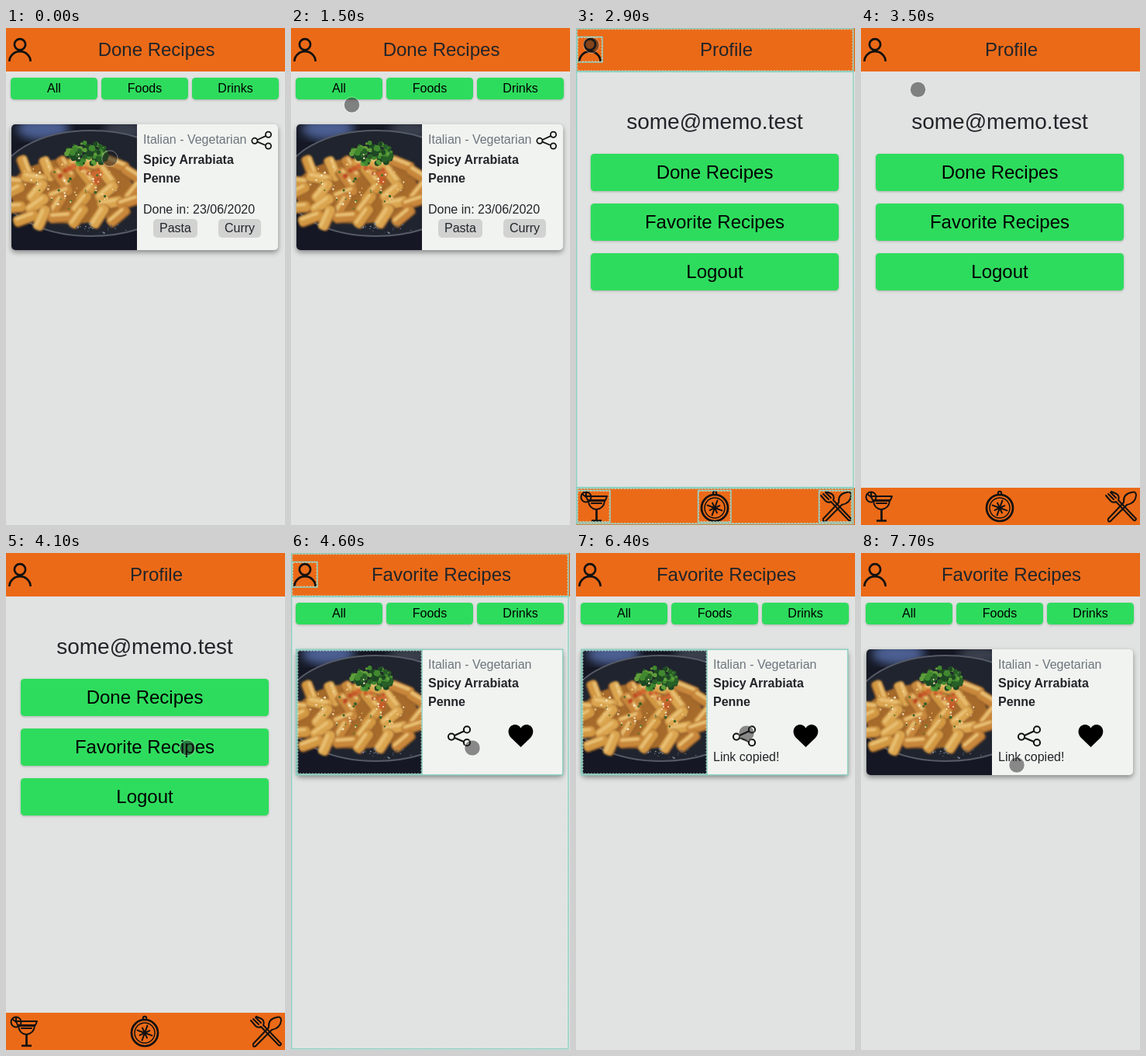
These frames come from a looping animation (360 px wide and 640 px high, 8 s). An HTML page:

```html
<!DOCTYPE html>
<html lang="en">
<head>
<meta charset="utf-8">
<title>Recipe app walkthrough</title>
<style>
  html, body { margin: 0; width: 100%; height: 100%; overflow: hidden; background: #e1e3e2; }
  svg { display: block; width: 100vw; height: 100vh; font-family: "Liberation Sans", Arial, sans-serif; }
  .mid { text-anchor: middle; }
  .button { fill: #2edc5d; filter: drop-shadow(0 1px 1.5px rgba(0, 0, 0, .22)); }
  .card { fill: #f1f3f0; filter: drop-shadow(0 3px 3px rgba(0, 0, 0, .4)); }
  .line { fill: none; stroke: #111; stroke-width: 2; stroke-linecap: round; stroke-linejoin: round; }
  .thin { stroke-width: 1.5; }
  .bold { stroke-width: 2.7; stroke-linecap: butt; }
  .flash { fill: none; stroke: #8fcfc1; stroke-width: 1.5; }
  .dash { fill: none; stroke: #d3ece2; stroke-width: .7; stroke-dasharray: 2 2; }
</style>
</head>
<body>
<svg id="stage" viewBox="0 0 360 640" preserveAspectRatio="none"></svg>
<script>
const LOOP = 8000, STEP = 100;
const INK = '#212529', ORANGE = '#eb6a18';

const rect = (x, y, w, h, attrs = '') => `<rect x="${x}" y="${y}" width="${w}" height="${h}" ${attrs}/>`;
const circle = (x, y, r, attrs = 'class="line"') => `<circle cx="${x}" cy="${y}" r="${r}" ${attrs}/>`;
const ellipse = (x, y, rx, ry, attrs) => `<ellipse cx="${x}" cy="${y}" rx="${rx}" ry="${ry}" ${attrs}/>`;
const path = (d, attrs = 'class="line"') => `<path d="${d}" ${attrs}/>`;
const text = (x, y, size, value, attrs = '', fill = INK) =>
  `<text x="${x}" y="${y}" font-size="${size}" fill="${fill}" ${attrs}>${value}</text>`;
const group = (id, content) => `<g id="${id}">${content}</g>`;
const repeat = (n, draw) => Array.from({ length: n }, (_, i) => draw(i)).join('');

function seeded(seed) {
  return () => (seed = seed * 16807 % 2147483647) / 2147483647;
}

function button(x, y, w, h, size, label) {
  return rect(x, y, w, h, 'rx="4.5" class="button"') +
    text(x + w / 2, Math.round(y + h / 2 + size * .34), size, label, 'class="mid"', '#000');
}

function header(title) {
  return rect(0, 0, 360, 56, `fill="${ORANGE}"`) +
    circle(18, 21.2, 7.1, 'class="line bold"') +
    path('M4.4 43A13.6 12.8 0 0 1 31.6 43', 'class="line bold"') +
    text(194, 36, 24, title, 'class="mid"');
}

const filters = () => ['All', 'Foods', 'Drinks']
  .map((label, i) => button(6 + 117 * i, 64, 112, 28, 16, label)).join('');

function share(x, y, scale) {
  return `<g transform="translate(${x} ${y}) scale(${scale})">` +
    path('M9 13L21 7.5M9 16L21 21') + circle(5, 14.6, 4.1) + circle(25, 5.4, 4.1) + circle(25, 22.2, 4.1) + '</g>';
}

function dish() {
  const rand = seeded(41);
  // Random point inside an ellipse.
  const spot = (cx, cy, rx, ry) => {
    const angle = rand() * 2 * Math.PI, reach = Math.sqrt(rand());
    return [cx + Math.cos(angle) * reach * rx, cy + Math.sin(angle) * reach * ry].map(v => v.toFixed(1));
  };
  const scatter = (n, area, size, fills) => repeat(n, i =>
    circle(...spot(...area), (size * (.5 + rand())).toFixed(1), `fill="${fills[i % fills.length]}"`));
  const piece = (x, y, angle, i) =>
    `<g transform="translate(${x} ${y}) rotate(${angle})">` +
    rect(-17, -7, 34, 15, 'rx="5" fill="#99602a"') +
    rect(-17, -7, 33, 13, `rx="5" fill="${['#d39843', '#dba54f', '#c8873a'][i % 3]}"`) +
    rect(-14, -5, 25, 4, 'rx="2" fill="#e8c073"') + '</g>';
  const rows = 5, columns = 6;
  const pasta = repeat(rows * columns, i => {
    const row = Math.floor(i / columns), across = (i % columns) / (columns - 1) * 2 - 1;
    const reach = [56, 76, 80, 78, 58][row];
    const x = 85 + across * reach + rand() * 8 - 4;
    const y = 178 + row * 16 - across * 3 + rand() * 6 - 3;
    return piece(x.toFixed(1), y.toFixed(1), Math.round((row < 2 ? 35 : -35) + (rand() - .5) * 70), i);
  });
  return '<g clip-path="url(#photo)">' +
    rect(7, 124, 162, 162, 'fill="#151824"') +
    ellipse(48, 130, 34, 14, 'fill="#4b5f92" filter="url(#soft)"') +
    ellipse(152, 132, 26, 12, 'fill="#3b404d" filter="url(#soft)"') +
    ellipse(110, 200, 120, 68, 'fill="#20242e" stroke="#555a66" stroke-width="2"') +
    '<g filter="url(#blur)">' + ellipse(85, 210, 80, 42, 'fill="#a66a2c"') + pasta +
    scatter(16, [100, 187, 34, 12], 3.5, ['#bd4a24', '#d06a30', '#c85b2b']) + '</g>' +
    scatter(85, [104, 162, 27, 15], 2.8, ['#285f27', '#41882f', '#5f9e3a', '#1d4823']) +
    scatter(16, [85, 208, 62, 25], 1.3, ['#4a7629', '#2f6128']) +
    scatter(50, [85, 195, 66, 36], 1, ['#f0dfb8', '#f7e8c8', '#e9c783']) +
    scatter(22, [126, 257, 35, 7], .8, ['#8995a6', '#535d6c']) + '</g>';
}

function card(titleY) {
  return rect(7, 124, 344, 162, 'rx="5" class="card"') + dish() +
    text(177, 149, 16, 'Italian - Vegetarian', '', '#6c757d') +
    text(177, titleY, 16, 'Spicy Arrabiata', 'font-weight="bold"') +
    text(177, titleY + 24, 16, 'Penne', 'font-weight="bold"');
}

const badge = (x, w, label) =>
  rect(x, 246, w, 24, 'rx="5" fill="#d1d2d1"') + text(x + 8, 263, 16, label);

function cocktail() {
  return circle(13, 604, 6.5) + path('M13 604L8 600M13 604V598') +
    path('M13 603H40L38 608H15ZM16 609Q17 619 26 620Q36 619 37 609ZM20 612H33') +
    path('M26.5 620V634M20 634.5H33', 'class="line bold"');
}

function compass() {
  return circle(179, 618, 17, 'class="line bold"') + circle(179, 618, 13, 'class="line thin"') +
    circle(179, 599, 2.2) +
    repeat(8, i => `<path class="line" transform="rotate(${i * 45 + 20} 179 618)" d="M179 618V${i % 2 ? 611 : 608}"/>`);
}

function cutlery() {
  return path('M316 602L322 609Q325 612 329 610L351 633Q354 636 355 632L332 608Q334 603 330 600L323 597M319 600L326 607M322 598L329 605') +
    path('M339 611Q338 600 349 598Q355 596 355 602Q354 612 343 614L322 635Q318 637 319 632Z');
}

const footer = () => rect(0, 592, 360, 48, `fill="${ORANGE}"`) + cocktail() + compass() + cutlery();

const outline = (x, y, w, h) =>
  rect(x, y, w, h, 'class="flash"') + rect(x + 1, y + 1, w - 2, h - 2, 'class="dash"');
const headOutlines = () => outline(.8, .8, 357, 55) + outline(1.5, 11.5, 32.5, 32.5);
const cardOutlines = () => outline(6.7, 124.2, 344, 161.5) + outline(8, 125, 161, 160);

document.getElementById('stage').innerHTML =
  `<defs>
    <clipPath id="photo"><path d="M169 124H12a5 5 0 0 0-5 5v152a5 5 0 0 0 5 5h157z"/></clipPath>
    <filter id="soft"><feGaussianBlur stdDeviation="6"/></filter>
    <filter id="blur"><feGaussianBlur stdDeviation=".8"/></filter>
  </defs>` +
  rect(0, 0, 360, 640, 'fill="#e1e3e2"') +
  group('done', header('Done Recipes') + filters() + card(175) + share(316.5, 132.5, .88) +
    text(177, 239, 16, 'Done in: 23/06/2020') + badge(190, 57, 'Pasta') + badge(274, 55, 'Curry')) +
  group('profile', header('Profile') + text(179, 130, 28, 'some@memo.test', 'class="mid"') +
    ['Done Recipes', 'Favorite Recipes', 'Logout']
      .map((label, i) => button(19, 162 + 64 * i, 320, 48, 24, label)).join('') + footer()) +
  group('favorite', header('Favorite Recipes') + filters() + card(173) + share(202, 222, 1) +
    path('M296.5 250L284 238C277 230 282 221 289 221Q294 221 296.5 225.5Q299 221 304 221C311 221 316 230 309 238Z', 'fill="#000"')) +
  group('copied', text(177, 268, 16, 'Link copied!')) +
  group('profileFlash', headOutlines() + outline(.8, 56.5, 357, 535) + outline(.8, 592.5, 357, 46) +
    repeat(3, i => outline(1.5 + 156 * i, 595.5, 42.5, 41))) +
  group('favoriteFlash', headOutlines() + outline(.8, 56.5, 357, 582) + cardOutlines()) +
  group('cardFlash', cardOutlines()) +
  group('pointer', circle(0, 0, 9.8, 'fill="rgba(30,30,30,.5)"') +
    circle(0, 0, 10.2, 'fill="none" stroke="rgba(255,255,255,.38)"'));

// Visible spans in milliseconds.
const spans = {
  done: [0, 2900], profile: [2900, 4600], favorite: [4600, LOOP], copied: [6300, LOOP],
  profileFlash: [2900, 3300], favoriteFlash: [4600, 4900], cardFlash: [6300, 6600]
};

// Pointer strokes: the first and last step of each, and where it ends.
const home = { x: 134, y: 168 };
const strokes = [
  { from: 1400, to: 1600, x: 60, y: 76 },
  { from: 1800, to: 1900, x: 26, y: 19 },
  { from: 2100, to: 2200, x: 20, y: 22 },
  { from: 3300, to: 4100, x: 234, y: 251 },
  { from: 5900, to: 5900, x: 220, y: 232 },
  { from: 7000, to: 7400, x: 207, y: 358 },
  { from: 7500, to: 7700, x: 201, y: 273 }
];

const ease = p => (1 - Math.cos(Math.PI * p)) / 2;

function pointerAt(time) {
  const now = Math.floor(time / STEP) * STEP;
  let { x, y } = home;
  for (const stroke of strokes) {
    if (now < stroke.from) break;
    const p = ease(Math.min(1, (now - stroke.from + STEP) / (stroke.to - stroke.from + STEP)));
    x += (stroke.x - x) * p;
    y += (stroke.y - y) * p;
  }
  return [x, y];
}

const byId = id => document.getElementById(id);

function draw(time) {
  for (const [id, [from, to]] of Object.entries(spans)) {
    byId(id).style.display = time >= from && time < to ? '' : 'none';
  }
  byId('pointer').setAttribute('transform', `translate(${pointerAt(time)})`);
}

const start = performance.now();
function tick() {
  draw((performance.now() - start) % LOOP);
  requestAnimationFrame(tick);
}
tick();
</script>
</body>
</html>
```
